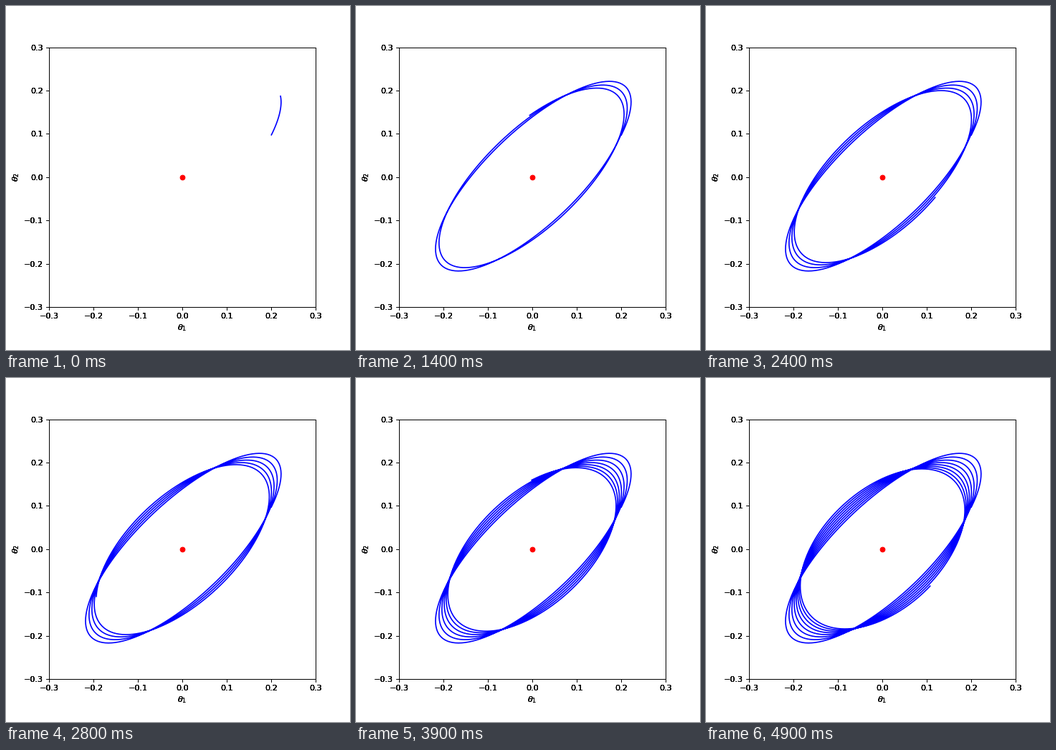
Recreate the animation shown at these times as a matplotlib script. Size 480 by 480 pixels, loop 5000 ms.

```python
import numpy as np
import matplotlib.pyplot as plt
from matplotlib.animation import FuncAnimation

FRAMES, INTERVAL = 50, 100
START, FIRST_TIP = -np.pi / 4, -0.234   # phases in radians; one radian per frame
LIMIT = 0.3
LAYERS = 4                              # stacked axes give the heavy lettering


def orbit(phase):
    """Ellipse along the diagonal whose long axis shrinks as the short one grows."""
    amplitude = 0.173 + 0.0488 * np.exp(-0.0308 * phase)
    short = 0.1035 + 0.00068 * phase
    long = np.sqrt(2 * amplitude**2 - short**2)
    u, v = long * np.cos(phase), short * np.sin(phase)
    return (u - v) / np.sqrt(2), (u + v) / np.sqrt(2)


def add_layer(fig):
    ax = fig.add_axes([0.125, 0.125, 0.775, 0.755])
    ax.patch.set_visible(False)
    ax.set(xlim=(-LIMIT, LIMIT), ylim=(-LIMIT, LIMIT),
           xlabel=r"$\theta_1$", ylabel=r"$\theta_2$")
    ticks = np.linspace(-LIMIT, LIMIT, 7)
    ax.set_xticks(ticks)
    ax.set_yticks(ticks)
    return ax


plt.rcParams.update({"font.family": "DejaVu Sans", "font.size": 10})
fig = plt.figure(figsize=(6, 6), dpi=80, facecolor="white")
ax = [add_layer(fig) for _ in range(LAYERS)][-1]
path, = ax.plot([], [], color="blue", lw=1.5)
ax.plot(0, 0, "o", color="red", ms=6)


def update(frame):
    tip = FIRST_TIP + frame
    samples = int((tip - START) * 40) + 2
    path.set_data(*orbit(np.linspace(START, tip, samples)))
    return path,


anim = FuncAnimation(fig, update, frames=FRAMES, interval=INTERVAL,
                     init_func=lambda: update(0), repeat=True, repeat_delay=0)
plt.show()
```
